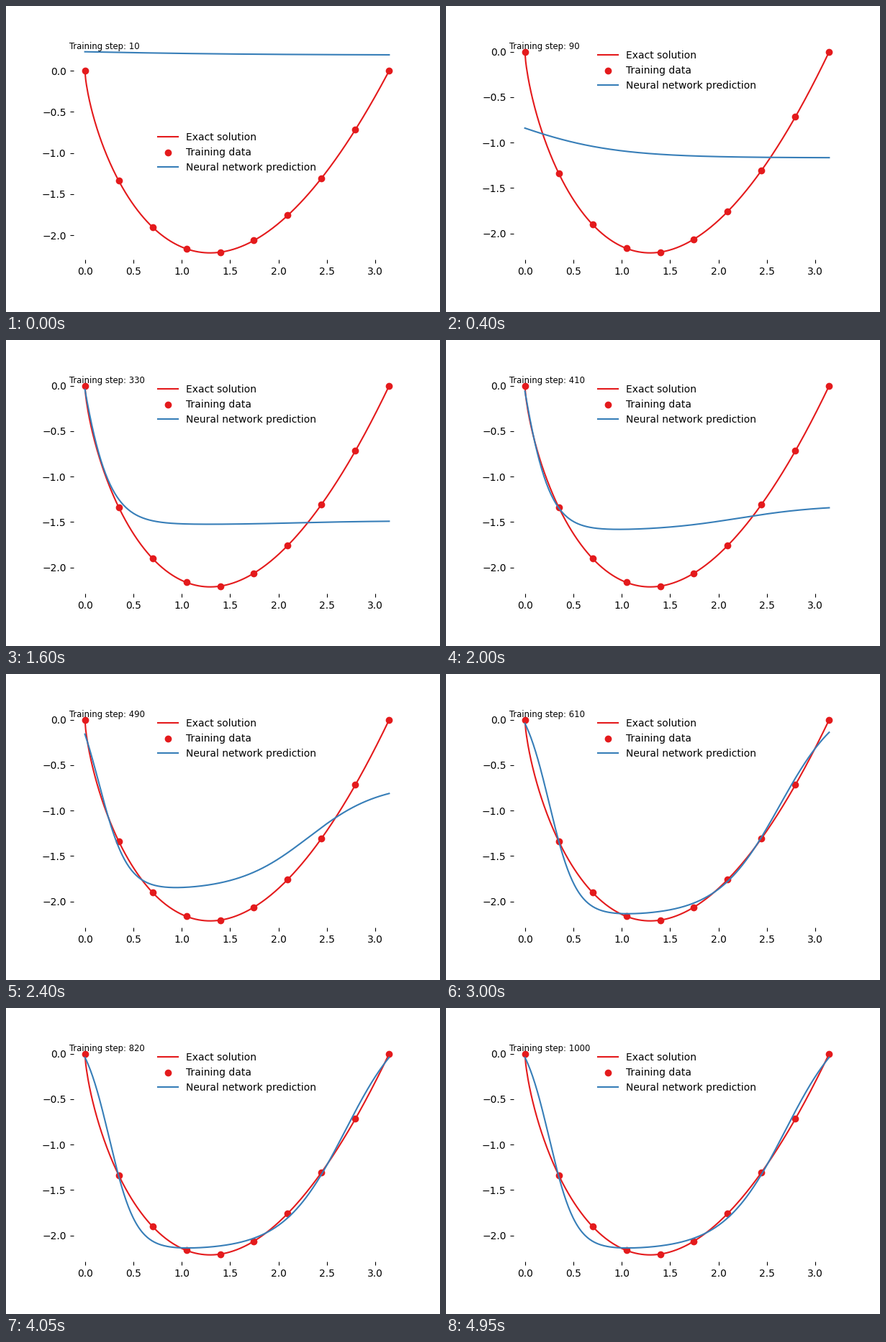
Animation, 603 px wide and 426 px high, one loop 5000 ms. Source, as a matplotlib script:

```python
import numpy as np
import matplotlib.pyplot as plt
from matplotlib.animation import FuncAnimation

W, H, DPI = 603, 426, 100
FRAMES, INTERVAL = 100, 50
RED, BLUE = "#e41a1c", "#377eb8"


def sigmoid(z):
    return 1 / (1 + np.exp(-z))


def ease(step, start, stop):
    t = np.clip((step - start) / (stop - start), 0, 1)
    return t * t * (3 - 2 * t)


def exact(x):
    return -x**0.7 * (np.pi - x)


def prediction(x, s):
    """Curve after s steps: a floor with one flank falling and one rising."""
    # The level drops first and the floor sinks again once the right flank grows
    floor = (0.19 - 1.66 * ease(s, 10, 120) - 0.06 * ease(s, 190, 330)
             - 0.63 * ease(s, 360, 600))
    dip = ease(s, 380, 490) - ease(s, 490, 600)
    left_end = (0.23 - 1.20 * ease(s, 10, 110) + 0.93 * ease(s, 80, 310)
                - 0.12 * dip)

    p = -0.2 + 0.45 * ease(s, 340, 560)
    w = 0.138 + 0.9 * np.exp(-s / 110)
    left = sigmoid((p - x) / w) / sigmoid(p / w)

    q = 2.19 + 0.5 * sigmoid((s - 534) / 38)
    v = 0.43 - 0.11 * ease(s, 400, 560)
    right = sigmoid((x - q) / v) / sigmoid((np.pi - q) / v)
    right_height = 2.12 * sigmoid((s - 489) / 40)

    return floor + (left_end - floor) * left + right_height * right


plt.rcParams["font.family"] = "DejaVu Sans"
fig = plt.figure(figsize=(W / DPI, H / DPI), dpi=DPI, facecolor="white")
ax = fig.add_axes([88.5 / W, 68.3 / H, 465 / W, 308 / H])
ax.spines[:].set_visible(False)
ax.tick_params(direction="in")
ax.set_xlim(-0.05 * np.pi, 1.05 * np.pi)

x = np.linspace(0, np.pi, 400)
truth = exact(x)
samples = np.linspace(0, np.pi, 10)
ax.plot(x, truth, color=RED, label="Exact solution")
ax.scatter(samples, exact(samples), color=RED, label="Training data")
line, = ax.plot(x, truth, color=BLUE, label="Neural network prediction")
ax.legend(loc="best", frameon=False)
caption = fig.text(88.4 / W, 1 - 60 / H, "", fontsize="small")


def update(i):
    step = 10 * (i + 1)
    y = prediction(x, step)
    line.set_ydata(y)
    low, high = min(truth.min(), y.min()), max(0, y.max())
    pad = 0.05 * (high - low)
    ax.set_ylim(low - pad, high + pad)
    caption.set_text(f"Training step: {step}")
    return line, caption


anim = FuncAnimation(fig, update, frames=FRAMES, interval=INTERVAL,
                     repeat=True, repeat_delay=0)
plt.show()
```
